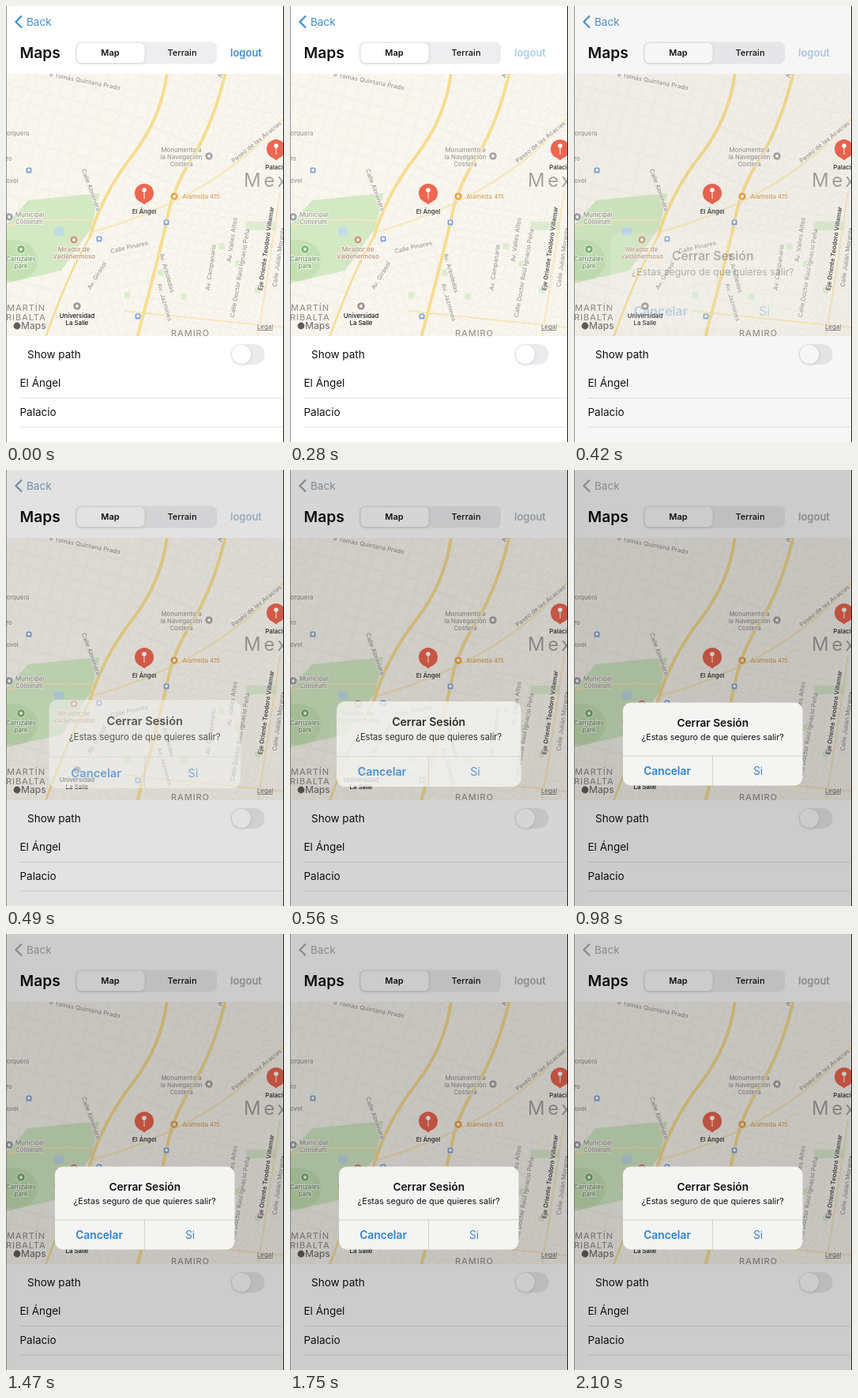
These frames come from a looping animation (352 px wide and 552 px high, 2.17 s). An HTML page with a canvas:

```html
<!DOCTYPE html>
<html lang="es">
<head>
<meta charset="utf-8">
<title>Maps</title>
<style>
html, body { margin: 0; width: 100%; height: 100%; overflow: hidden; background: #fff; }
canvas { display: block; width: 352px; height: 552px; }
</style>
</head>
<body>
<canvas id="stage" width="352" height="552"></canvas>
<script>
const W = 352, H = 552, LOOP = 2170, STEP = 70;
const TOP = 86, BOTTOM = 418;
const FONT = 'Inter, "Open Sans", sans-serif';
const LAND = '#f9f6ee', PALE = '#fbecc0', YELLOW = '#f8dd8b';
const BLUE = [66, 141, 207], GREY = [172, 172, 172];

let g = document.getElementById('stage').getContext('2d');

function random(seed) {
  return () => (seed = (seed * 16807) % 2147483647) / 2147483647;
}

function text(s, x, y, size, o = {}) {
  g.save();
  g.translate(x, y);
  g.rotate((o.turn || 0) * Math.PI / 180);
  g.font = `${o.weight || 400} ${size}px ${FONT}`;
  g.textAlign = o.align || 'left';
  g.letterSpacing = (o.space || 0) + 'px';
  const base = size * 0.36;
  if (o.halo) {
    g.strokeStyle = 'rgba(251,249,244,.85)';
    g.lineWidth = 2;
    g.lineJoin = 'round';
    g.strokeText(s, 0, base);
  }
  g.fillStyle = o.color || '#111';
  g.fillText(s, 0, base);
  g.restore();
}

function box(x, y, w, h, r, color) {
  g.beginPath();
  g.roundRect(x, y, w, h, r);
  g.fillStyle = color;
  g.fill();
}

function dot(x, y, r, color) {
  g.beginPath();
  g.arc(x, y, r, 0, 7);
  g.fillStyle = color;
  g.fill();
}

function raised(paint) {
  g.save();
  g.shadowColor = 'rgba(0,0,0,.13)';
  g.shadowBlur = 4;
  g.shadowOffsetY = 1;
  paint();
  g.restore();
}

function trace(pts) {
  g.beginPath();
  for (const [x, y] of pts) g.lineTo(x, y);
}

// Smooth stroke with the inner points as curve handles.
function curve(color, width, ...pts) {
  const end = pts.length - 1;
  g.beginPath();
  g.moveTo(...pts[0]);
  for (let i = 1; i < end; i++) {
    const [x, y] = pts[i], [nx, ny] = pts[i + 1];
    if (i === end - 1) g.quadraticCurveTo(x, y, nx, ny);
    else g.quadraticCurveTo(x, y, (x + nx) / 2, (y + ny) / 2);
  }
  g.lineTo(...pts[end]);
  g.strokeStyle = color;
  g.lineWidth = width;
  g.stroke();
}

function road(color, width, ...pts) {
  curve('#f1dfb0', width + 0.8, ...pts);
  curve(color, width, ...pts);
}

// Paints a district over the ground with a jittered, turned street grid.
function district(turn, gap, seed, ...pts) {
  const rnd = random(seed);
  g.save();
  trace(pts);
  g.clip();
  g.fillStyle = LAND;
  g.fillRect(0, TOP, W, H);
  g.translate(W / 2, (TOP + BOTTOM) / 2);
  g.rotate(turn * Math.PI / 180);
  const lines = [];
  for (const side of [0, 1]) {
    for (let d = -270; d < 270; d += gap * (0.7 + rnd() * 0.6)) {
      const mid = d + (rnd() - 0.5) * 6;
      const pair = [[d, -270], [mid, 0], [d, 270]];
      lines.push(side ? pair : pair.map(([x, y]) => [y, x]));
    }
  }
  for (const l of lines) curve('#e8e3d8', 2.2, ...l);
  for (const l of lines) curve('#fffefb', 1.1, ...l);
  g.restore();
}

function label(s, x, y, turn = 0, o = {}) {
  s.split('\n').forEach((row, i) => text(row, x, y + i * 9, 7.8, {
    align: 'center', weight: 500, color: '#9b9791', halo: true, turn, ...o
  }));
}

function place(x, y, color) {
  dot(x, y, 5.5, '#fff');
  dot(x, y, 4.8, color);
  dot(x, y, 1.9, '#fff');
}

function spot(name, x, y, icon, color) {
  place(x, y, icon);
  label(name, x, y + 12, 0, { color });
}

function metro(x, y) {
  box(x - 4, y - 4, 8, 8, 2, '#fff');
  box(x - 3.5, y - 3.5, 7, 7, 1.5, '#7f9fd0');
  box(x - 1.8, y - 2, 3.6, 3.5, 0.8, '#fff');
}

function pin(name, x, y) {
  const red = '#ed6650';
  g.fillStyle = red;
  trace([[x - 4, y + 11], [x, y + 14.5], [x + 4, y + 11]]);
  g.fill();
  dot(x, y, 12, red);
  dot(x, y - 4, 2.8, '#fff');
  box(x - 0.5, y - 3, 1, 10, 0, '#fff');
  label(name, x, y + 23, 0, { weight: 600, color: '#403e3b' });
}

function drawParks() {
  g.fillStyle = '#d2e9c3';
  trace([[0, 277], [28, 246], [118, 237], [108, 281], [70, 335], [0, 351]]);
  g.fill();
  g.fillStyle = '#c5e1b4';
  g.beginPath();
  g.ellipse(10, 322, 30, 26, 0, 0, 7);
  g.fill();
  box(61, 280, 12, 11, 4, '#bfdcea');
  box(304, 273, 38, 11, 1, '#dcedcf');
  const rnd = random(5);
  for (let i = 0; i < 6; i++) box(150 + rnd() * 180, 290 + rnd() * 110, 7, 8, 1, '#dcedcf');
}

function drawRoads() {
  road(PALE, 1, [0, 279], [50, 266], [112, 272]);
  road(PALE, 1.4, [352, 141], [270, 240], [110, 286]);
  road(PALE, 1, [347, 235], [335, 320], [319, 418]);
  road(PALE, 1, [150, 386], [250, 396], [352, 407]);
  const fork = [106, 293];
  road(YELLOW, 1.8, fork, [80, 335], [50, 420]);
  road(YELLOW, 3.2, [204, 84], [197, 142], [122, 238], fork);
  road(YELLOW, 3.2, [278, 84], [262, 150], [212, 230], [198, 300], [166, 420]);
}

function drawLabels() {
  label('e Tomás Quintana Prado', 100, 95, 11);
  label('A', 271, 88, -75);
  label('orquera', 15, 161);
  label('ro', 4, 193);
  label('ovel', 8, 221);
  label('Calle Almendro', 108, 233, 70);
  label('Paseo de las Acacias', 317, 172, -39);
  label('Calle Pinares', 156, 305, -13);
  label('Av. Girasol', 115, 341, -59);
  label('Av. Arboledas', 204, 338, 74);
  label('Av. Jazmines', 201, 375, 74);
  label('Av. Campanario', 259, 331, -82);
  label('Av. Valles Altos', 286, 296, -82);
  label('Calle Doctor Raúl Ignacio Peña', 296, 338, -80);
  label('Eje Oriente Teodoro Villamar', 329, 307, -82, { color: '#4c4945', weight: 600 });
  label('Calle Julián Morante', 345, 318, -82);

  label('Monumento a\nla Navegación\nCostera', 222, 182);
  place(257, 190, '#aaa6a2');
  label('Alameda 415', 247, 241, 0, { color: '#d8a057' });
  place(213, 241, '#eca64a');
  label('Municipal\nColiseum', 12, 264, 0, { align: 'left' });
  place(4, 267, '#a5a0ad');
  spot('Mirador de\nValdehermoso', 86, 296, '#c9987a', '#b28d70');
  spot('Carrizales\npark', 19, 308, '#76b76b', '#64935d');
  spot('Universidad\nLa Salle', 90, 380, '#a6978b');

  text('Mex', 301, 220, 24, { space: 3.5, color: '#a5a19c', halo: true });
  const borough = { space: 0.9, weight: 500, color: '#98948f', halo: true };
  text('MARTÍN', 1, 382, 11, borough);
  text('RIBALTA', 0, 394, 11, borough);
  text('RAMIRO', 209, 414, 11, borough);

  metro(29, 208);
  metro(203, 274);
  metro(118, 295);
  metro(167, 393);
  pin('El Ángel', 175, 237);
  pin('Palacio', 342, 181);

  dot(14, 405, 4.4, '#5f5e5c');
  text('Maps', 19, 405, 12, { weight: 500, color: '#777572', halo: true });
  label('Legal', 328, 406, 0, { color: '#77746f' });
  box(318, 410, 20, 0.8, 0, '#77746f');
}

const mapLayer = document.createElement('canvas');
mapLayer.width = W;
mapLayer.height = H;
function buildMap() {
  const screen = g;
  g = mapLayer.getContext('2d');
  g.rect(0, TOP, W, BOTTOM - TOP);
  g.clip();
  district(14, 17, 11, [0, 86], [352, 86], [352, 418], [0, 418]);
  district(24, 13, 27, [203, 86], [277, 86], [200, 285], [106, 293], [185, 150]);
  district(-14, 13, 59, [106, 290], [200, 278], [165, 418], [50, 418]);
  district(9, 11, 43, [277, 86], [352, 86], [352, 418], [165, 418], [207, 250]);
  drawParks();
  drawRoads();
  drawLabels();
  g = screen;
}

function tint(p, alpha = 1) {
  return `rgba(${BLUE.map((c, i) => Math.round(c + (GREY[i] - c) * p))},${alpha})`;
}

function drawScreen(p, press) {
  box(0, 0, W, H, 0, '#fff');
  g.drawImage(mapLayer, 0, 0);

  trace([[20, 12.5], [12.5, 20], [20, 27.5]]);
  g.strokeStyle = tint(p);
  g.lineWidth = 2.2;
  g.stroke();
  text('Back', 26, 20, 13.5, { color: tint(p) });
  text('Maps', 17.5, 59, 19.2, { weight: 600 });

  box(88, 45.5, 179, 28, 7, '#eeeef0');
  raised(() => box(89.5, 47, 86, 25, 6, '#fff'));
  text('Map', 132, 59, 11, { align: 'center', weight: 600 });
  text('Terrain', 223, 59, 11, { align: 'center', weight: 500 });
  const fade = 1 - press * 0.55 * (1 - p * p);
  text('logout', 304, 59, 13, { align: 'center', weight: 600, color: tint(p, fade) });

  text('Show path', 27, 441, 13.5);
  box(285, 428, 42.5, 26, 13, '#ebebed');
  raised(() => dot(298, 441, 12, '#fff'));
  ['El Ángel', 'Palacio'].forEach((name, i) => {
    text(name, 17.5, 477 + i * 37, 13.5);
    box(18, 496 + i * 36.5, 332, 1, 0, '#e3e3e5');
  });
}

function drawAlert(p) {
  const cx = 175.7, cy = 347, scale = 1.2 - 0.2 * p;
  const mid = { align: 'center' };
  g.save();
  g.translate(cx, cy);
  g.scale(scale, scale);
  g.translate(-cx, -cy);
  g.globalAlpha = Math.pow(p, 1.5);
  box(62, 294.5, 227.5, 105, 10, 'rgba(245,245,243,.985)');
  box(62, 361.5, 227.5, 1, 0, '#cfcfce');
  box(175, 362, 1, 37.5, 0, '#cfcfce');
  g.globalAlpha = p;
  text('Cerrar Sesión', cx, 320, 13.7, { ...mid, weight: 600 });
  text('¿Estas seguro de que quieres salir?', cx, 338, 10.8, mid);
  text('Cancelar', 118, 381, 13.8, { ...mid, weight: 600, color: '#2f82cf' });
  text('Si', 233, 381, 13.8, { ...mid, color: '#3f8acb' });
  g.restore();
}

function draw(t) {
  // A critically damped spring drives dimming, scale and opacity together.
  const s = Math.max(0, t - 360) * 0.0177;
  const p = 1 - (1 + s) * Math.exp(-s);
  const dim = Math.pow(p, 1.4);
  drawScreen(dim, Math.min(1, t / 140));
  box(0, 0, W, H, 0, `rgba(0,0,0,${0.2 * dim})`);
  if (p > 0) drawAlert(p);
  box(0, 0, 0.6, H, 0, '#555');
  box(351, 0, 1, H, 0, '#222');
}

buildMap();
const start = performance.now();
let last = -1;
function tick() {
  const step = Math.floor(((performance.now() - start) % LOOP) / STEP);
  if (step !== last) draw((last = step) * STEP);
  requestAnimationFrame(tick);
}
tick();
</script>
</body>
</html>
```
